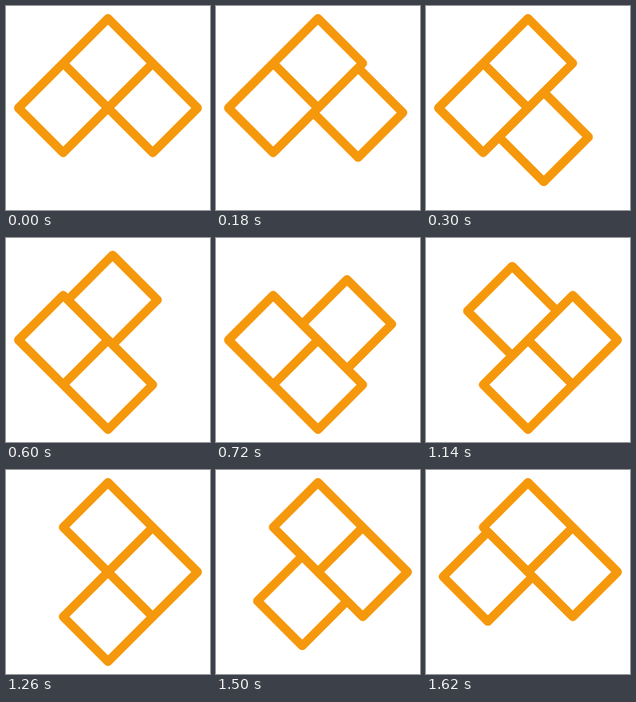
These frames come from a looping animation (256 px wide and 256 px high, 1.68 s). An HTML page with a canvas:

```html
<!DOCTYPE html>
<html lang="en">
<head>
<meta charset="utf-8">
<title>Sliding squares</title>
<style>
  html, body { margin: 0; width: 100%; height: 100%; overflow: hidden; background: #fff; }
  canvas { display: block; width: 256px; height: 256px; }
</style>
</head>
<body>
<canvas id="stage" width="256" height="256"></canvas>
<script>
const ctx = document.getElementById('stage').getContext('2d');
const CENTER = 128, HALF = 56.2;
const TICK = 60, TICKS_PER_MOVE = 7, REST_TICKS = 3, MOVES = 4;

// Slots run clockwise: top, right, bottom, left
const SLOTS = [[0, -1], [1, 0], [0, 1], [-1, 0]];
const slot = i => SLOTS[(i + 8) % 4];
const ease = u => u * u * (3 - 2 * u);

function diamond(x, y) {
  const cx = CENTER + x * HALF, cy = CENTER + y * HALF;
  ctx.moveTo(cx, cy - HALF);
  ctx.lineTo(cx + HALF, cy);
  ctx.lineTo(cx, cy + HALF);
  ctx.lineTo(cx - HALF, cy);
  ctx.closePath();
}

function draw(time) {
  const tick = Math.floor(time / TICK) % (TICKS_PER_MOVE * MOVES);
  const move = Math.floor(tick / TICKS_PER_MOVE);
  const step = tick % TICKS_PER_MOVE;
  const p = step < REST_TICKS ? 0 : ease((step - REST_TICKS + 1) / 5);

  // Each move slides one square clockwise into the empty slot
  const from = 1 - move;
  const [ax, ay] = slot(from), [bx, by] = slot(from + 1);

  ctx.fillStyle = '#fff';
  ctx.fillRect(0, 0, 256, 256);
  ctx.strokeStyle = '#f5980c';
  ctx.lineWidth = 11;
  ctx.lineJoin = 'round';
  ctx.beginPath();
  diamond(...slot(from + 2));
  diamond(...slot(from + 3));
  diamond(ax + (bx - ax) * p, ay + (by - ay) * p);
  ctx.stroke();
}

const start = performance.now();
function loop() {
  draw(performance.now() - start);
  requestAnimationFrame(loop);
}
loop();
</script>
</body>
</html>
```
